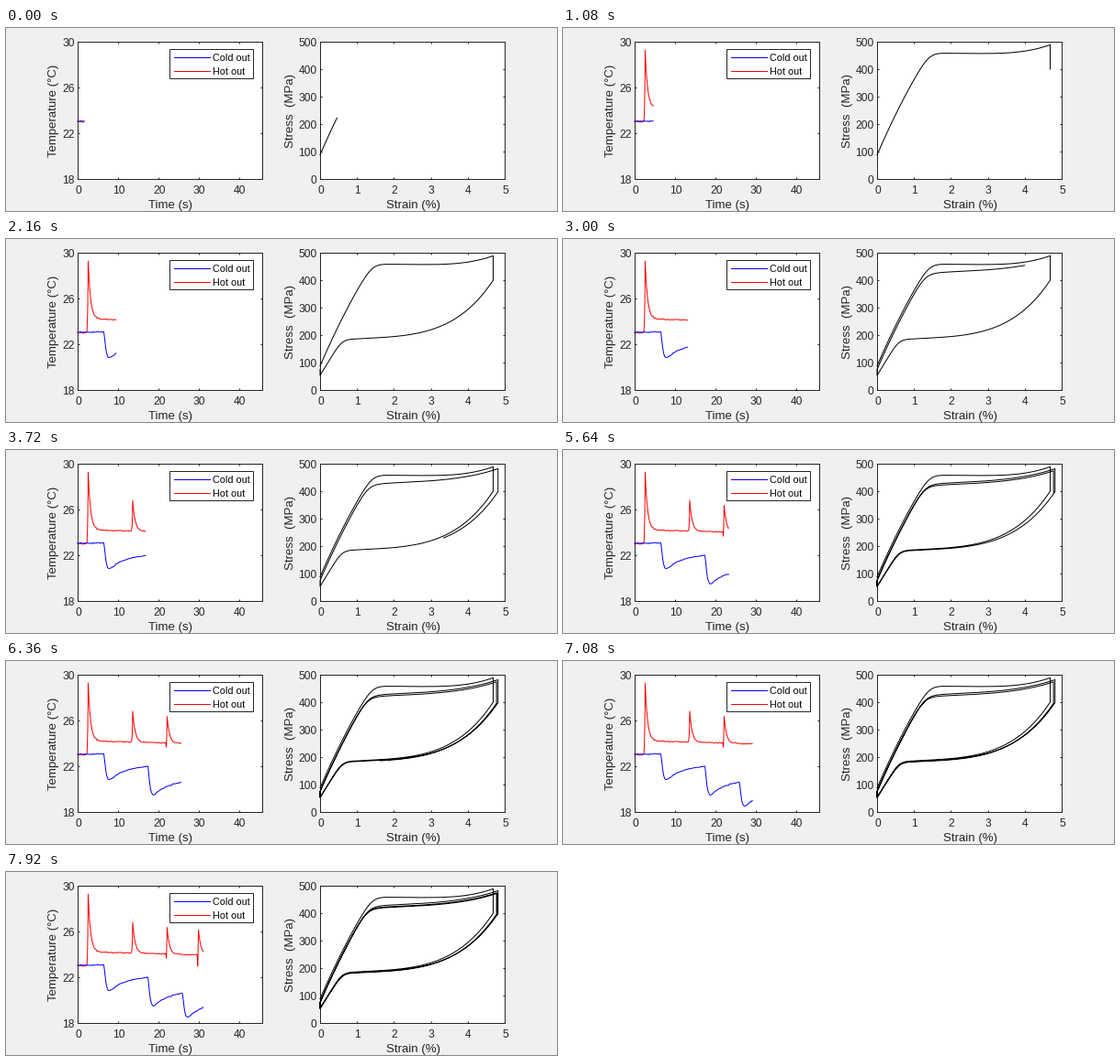
Write a matplotlib script that moves like this. It is 600x200 px and loops after 8000 ms.

```python
import numpy as np
import matplotlib.pyplot as plt
from matplotlib.animation import FuncAnimation
from matplotlib.lines import Line2D
from matplotlib.patches import Rectangle
from matplotlib.transforms import Affine2D

W, H, DPI = 600, 200, 100
PX = 72 / DPI                 # points per pixel
INK = "#262626"
STEP_MS, TICK_MS, LOOP_MS = 120, 40, 8000

plt.rcParams["font.family"] = "Liberation Sans"
fig = plt.figure(figsize=(W / DPI, H / DPI), dpi=DPI, facecolor="#f0f0f0")
pixels = Affine2D().scale(1 / W, -1 / H).translate(0, 1) + fig.transFigure


def text(x, y, s, size=12, ha="center", rot=0, color=INK):
    fig.text(x, y, s, fontsize=size * PX, ha=ha, va="baseline", rotation=rot,
             rotation_mode="anchor", color=color, transform=pixels, zorder=7)


def panel(left, xmax, ylim, xticks, yticks, xlabel, ylabel, label_x):
    top, wide, tall = 15, 201, 150
    ax = fig.add_axes([left / W, 1 - (top + tall) / H, wide / W, tall / H])
    ax.set(xlim=(0, xmax), ylim=ylim, xticks=xticks, yticks=yticks)
    ax.tick_params(direction="in", top=True, right=True, length=2 * PX,
                   width=PX, color=INK, labelbottom=False, labelleft=False)
    for spine in ax.spines.values():
        spine.set(linewidth=PX, color=INK)
    for v in xticks:
        text(left + .5 + wide * v / xmax, 181.3, str(v))
    for v in yticks:
        y = top + tall * (ylim[1] - v) / (ylim[1] - ylim[0])
        text(left - 3.5, y + 4.6, str(v), ha="right")
    text(left + .5 + wide / 2, 197, xlabel, 13.2)
    text(label_x, 90.5, ylabel, 13.2, rot=90)
    return ax


def curve(ax, color):
    return ax.plot([], [], color=color, lw=PX, zorder=3, clip_on=False)[0]


# Load and unload strokes alternate, with a hold after each one
STROKE, STROKE_S = 8.2, .8    # length in steps and in test seconds
STARTS = np.array([-.8, 9.4, 18.2, 28.5, 37.8, 47.6, 56.8, 66.5])
CLOCK = np.array([1.5, 5.6, 12.35, 16.5, 20.85, 25, 28.85, 32.3])
PEAKS = [4.69, 4.82, 4.78, 4.80]


def soft_min(a, b, p):
    return (a ** -p + b ** -p) ** (-1 / p)


def load_stress(n, e):
    if n == 0:
        start, plateau = 88, 457 + 29 * abs((e - 2.7) / 1.93) ** 3
    else:
        start, plateau = 75, 422 + 4 * e + .0156 * e ** 5 - 6 * (n - 1) ** .5
    return soft_min(start + 310 * e - 36 * e * e, plateau, 18)


def unload_stress(n, e):
    x = e * PEAKS[0] / PEAKS[n]
    return soft_min(53 + 220 * x, 183 + 4 * x + .139 * x ** 4.7, 10) - 2 * n * min(1, e)


def stroke_stress(i, e):
    return (unload_stress if i % 2 else load_stress)(i // 2, e)


def state(k):
    """Test time, strain and stress at step k."""
    i = np.searchsorted(STARTS, k, side="right") - 1
    p = (k - STARTS[i]) / STROKE
    peak = PEAKS[i // 2]
    if p <= 1:
        e = peak * (1 - p if i % 2 else p)
        return CLOCK[i] + STROKE_S * p, e, stroke_stress(i, e)
    stop_k, stop_t = STARTS[i] + STROKE, CLOCK[i] + STROKE_S
    u = (k - stop_k) / (STARTS[i + 1] - stop_k)
    t = stop_t + (CLOCK[i + 1] - stop_t) * u ** 1.65
    e = 0 if i % 2 else peak
    a, b = stroke_stress(i, e), stroke_stress(i + 1, e)
    return t, e, a + (b - a) * min(1, 1.7 * u)


steps = np.arange(-16, 1321) / 20
clock, strain, stress = np.array([state(k) for k in steps]).T

times = np.arange(0, 31.5, .05)
rng = np.random.default_rng(4)


def noise():
    knots = np.arange(0, 32, .3)
    return np.interp(times, knots, rng.normal(0, .025, len(knots)))


# Each load heats the hot side in a sharp pulse after a short undershoot
hot = 23 + (1.25 - .01 * times) * np.clip((times - 2.3) / .3, 0, 1) + noise()
for peak_t, rise, dip in [(2.6, 5.05, 0), (13.6, 2.7, 0), (22.1, 2.3, .7), (29.85, 2.2, 1.3)]:
    s = times - peak_t
    hot += rise * np.exp(np.where(s < 0, s / .09, -s / .58))
    hot -= dip * np.exp(-((s + .18) / .08) ** 2)

# Each unload chills the cold side, which then partly recovers
cold = 23.05 + noise()
for start, lasting in zip(CLOCK[1::2], (.95, 1.25, .9)):
    s = np.maximum(0, times - start - STROKE_S - .05)
    cold -= (lasting + 1.9 * np.exp(-s / 4)) * (1 - np.exp(-(s / .6) ** 1.5))

temp_ax = panel(78, 45.6, (18, 30), range(0, 41, 10), range(18, 31, 4),
                "Time (s)", "Temperature (°C)", 55.5)
load_ax = panel(342, 5, (0, 500), range(6), range(0, 501, 100),
                "Strain (%)", "Stress  (MPa)", 313)
hot_line = curve(temp_ax, "red")
cold_line = curve(temp_ax, "blue")
loop_line = curve(load_ax, "black")

# Legend
fig.add_artist(Rectangle((178, 23), 91, 32, fc="white", ec=INK, lw=PX,
                         transform=pixels, zorder=5))
for y, color, name in [(32, "blue", "Cold out"), (47, "red", "Hot out")]:
    fig.add_artist(Line2D([183, 222], [y, y], color=color, lw=PX,
                          transform=pixels, zorder=6))
    text(224.7, y + 4.3, name, 10.8, ha="left", color="black")


def reveal(line, x, y, key, now):
    """Show the curve up to key == now."""
    n = np.searchsorted(key, now, side="right")
    line.set_data(np.append(x[:n], np.interp(now, key, x)),
                  np.append(y[:n], np.interp(now, key, y)))


def update(i):
    k = i * TICK_MS // STEP_MS
    now = np.interp(k, steps, clock)
    reveal(hot_line, times, hot, times, now)
    reveal(cold_line, times, cold, times, now)
    reveal(loop_line, strain, stress, steps, k)
    return hot_line, cold_line, loop_line


anim = FuncAnimation(fig, update, frames=LOOP_MS // TICK_MS, interval=TICK_MS,
                     init_func=lambda: update(0), repeat=True, repeat_delay=0)
plt.show()
```
